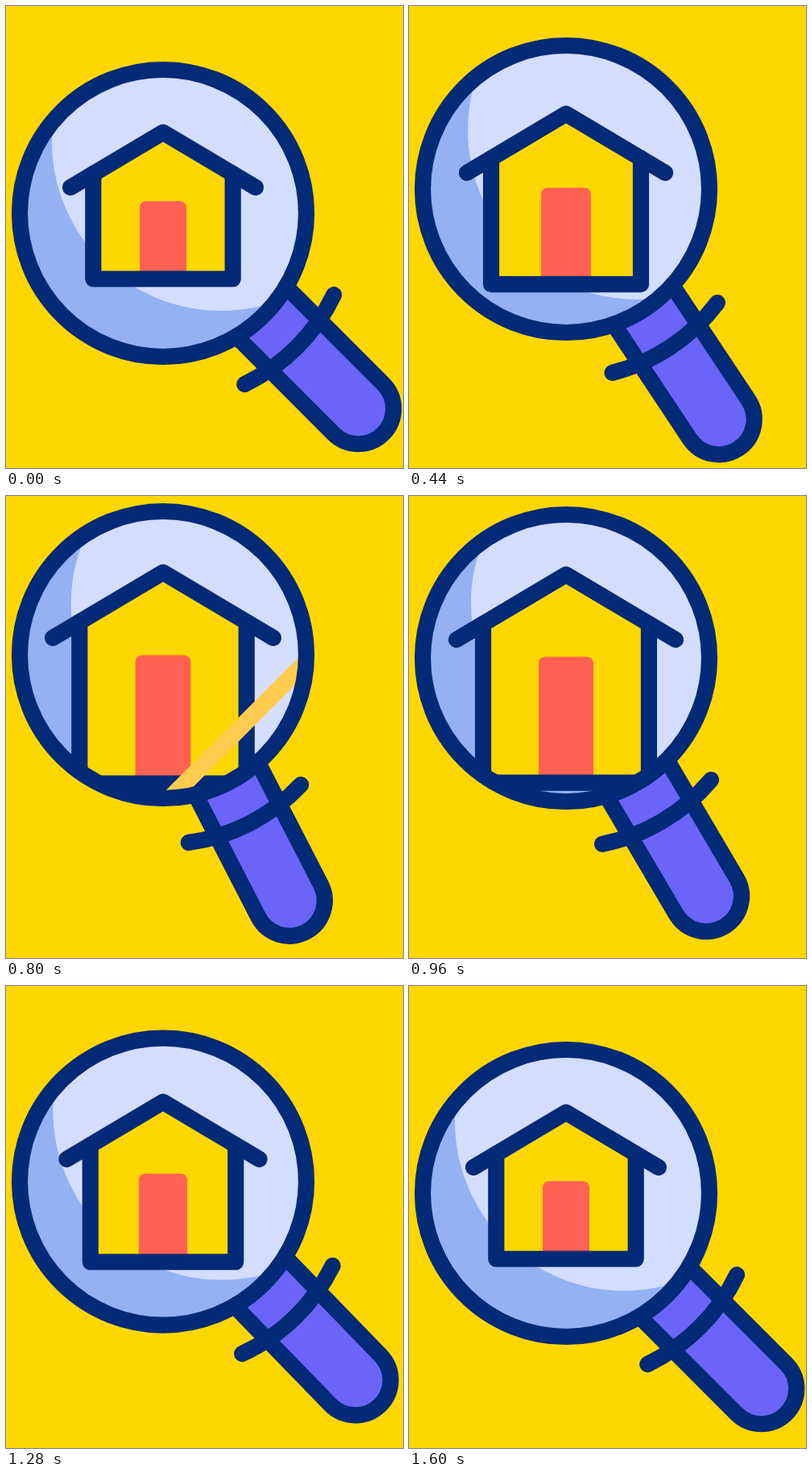
An HTML page with a canvas for the animation above (1.68 s loop, 493 px wide and 573 px high).

```html
<!DOCTYPE html>
<html lang="en">
<head>
<meta charset="utf-8">
<title>House search</title>
<style>
  html, body { margin: 0; height: 100%; overflow: hidden; background: #ffd700; }
  canvas { display: block; }
</style>
</head>
<body>
<canvas id="stage" width="493" height="573"></canvas>
<script>
const ctx = document.getElementById('stage').getContext('2d');
const NAVY = '#032a76', YELLOW = '#ffd700', PURPLE = '#6a64f8', CORAL = '#ff6152';
const PALE = '#d3ddfd', BLUE = '#93b1f3', SHINE = '#ffcc50';
const LOOP = 1680, STEP = 40, CX = 195, LENS = 178;

const clamp = u => Math.max(0, Math.min(1, u));
const ease = (t, from, to) => {
  const u = clamp((t - from) / (to - from));
  return u * u * u * (u * (6 * u - 15) + 10);
};
// Rises between a and b, falls between c and d.
const pulse = (t, a, b, c, d) => ease(t, a, b) - ease(t, c, d);

function shape(draw, fill, stroke) {
  ctx.beginPath();
  draw();
  if (fill) { ctx.fillStyle = fill; ctx.fill(); }
  if (stroke) { ctx.strokeStyle = stroke; ctx.stroke(); }
}
const disc = (x, y, r) => () => ctx.arc(x, y, r, 0, 2 * Math.PI);
const line = (...points) => () => points.forEach(p => ctx.lineTo(...p));

function drawHandle() {
  shape(() => {
    ctx.moveTo(150, -43.7);
    ctx.arc(343, 0, 43.7, -Math.PI / 2, Math.PI / 2);
    ctx.lineTo(150, 43.7);
  }, PURPLE, NAVY);
  shape(() => ctx.arc(0, 0, 235, -0.34, 0.34), null, NAVY);
}

function drawHouse(grow) {
  const half = 86.7 + 17 * grow, eave = 115 + 22 * grow, eaveY = 225 - 49 * grow;
  const apex = 156.7 - 62 * grow, base = 338.5 + 18 * grow;
  const wallTop = apex + (eaveY - apex) * half / eave;
  const door = 29 + 5.3 * grow, doorTop = 242 - 44.5 * grow;

  shape(line([CX - half, wallTop], [CX, apex], [CX + half, wallTop],
    [CX + half, base], [CX - half, base]), YELLOW);
  shape(() => ctx.roundRect(CX - door, doorTop, 2 * door, base - doorTop, [8, 8, 0, 0]), CORAL);
  shape(line([CX - half, wallTop], [CX - half, base], [CX + half, base], [CX + half, wallTop]),
    null, NAVY);
  shape(line([CX - eave, eaveY], [CX, apex], [CX + eave, eaveY]), null, NAVY);
}

function draw(t) {
  const cy = 257 - 60 * pulse(t, 75, 805, 805, 1540);
  const turn = 17.8 * pulse(t, 95, 695, 755, 1400) * Math.PI / 180;
  const grow = pulse(t, 152, 822, 841, 1499);
  const sweep = (t - 530) / 310;

  ctx.fillStyle = YELLOW;
  ctx.fillRect(0, 0, 493, 573);
  ctx.lineWidth = 20.2;
  ctx.lineCap = ctx.lineJoin = 'round';

  ctx.save();
  ctx.translate(CX, cy);
  ctx.rotate(turn + Math.PI / 4);
  drawHandle();
  ctx.restore();

  ctx.save();
  shape(disc(CX, cy, LENS), BLUE);
  ctx.clip();
  ctx.save();
  ctx.translate(CX, cy);
  ctx.rotate(turn);
  shape(disc(72, -89, 210), PALE);
  ctx.restore();
  drawHouse(grow);
  if (sweep > 0 && sweep < 1) {
    ctx.translate(CX, cy);
    ctx.rotate(Math.PI / 4);
    ctx.fillStyle = SHINE;
    ctx.fillRect(-187 + 354 * sweep, -200, 21, 400);
  }
  ctx.restore();

  shape(disc(CX, cy, LENS), null, NAVY);
}

function frame() {
  draw(Math.floor(performance.now() % LOOP / STEP) * STEP);
  requestAnimationFrame(frame);
}
frame();
</script>
</body>
</html>
```
